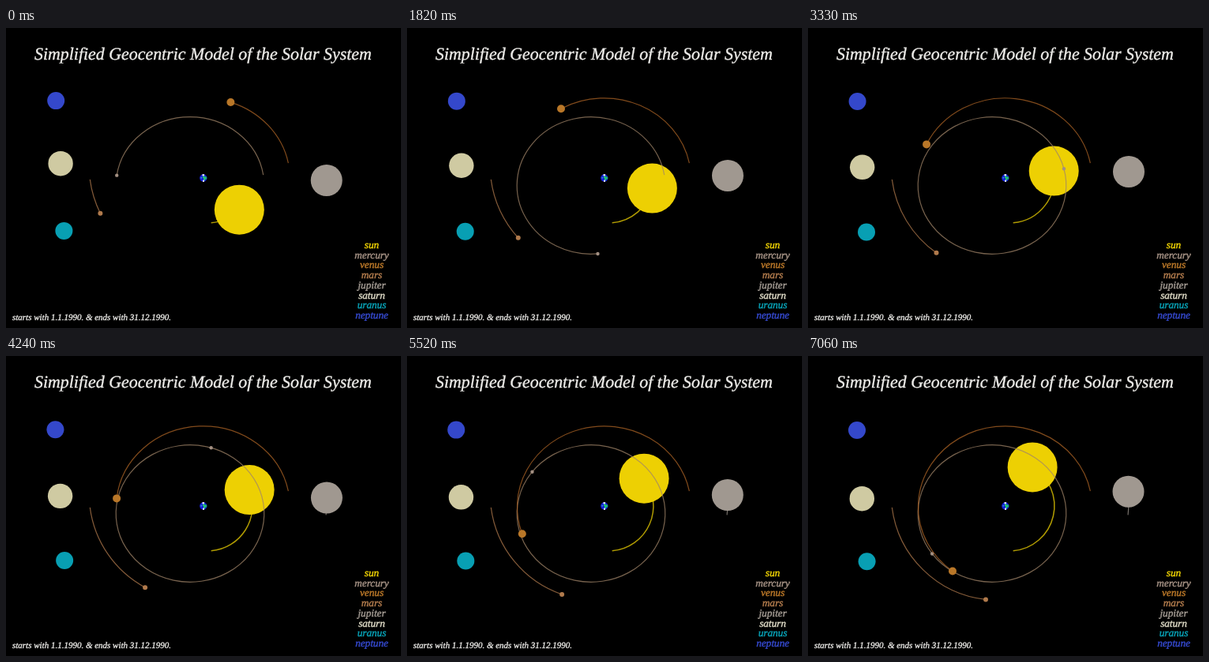
Animation of 500 by 380 pixels, one loop 7.09 s. Source, as an HTML page:

```html
<!DOCTYPE html>
<html lang="en">
<head>
<meta charset="utf-8">
<title>Simplified Geocentric Model of the Solar System</title>
<style>
  html, body { margin: 0; width: 100%; height: 100%; overflow: hidden; background: #000; }
  svg { display: block; width: 500px; height: 380px; }
  text { font-family: "Liberation Serif", "Times New Roman", serif; font-style: italic; fill: #ecebe8; text-rendering: geometricPrecision; }
  .title { font-size: 21.9px; stroke: #ecebe8; stroke-width: .4px; }
  .note { font-size: 11px; stroke: #ecebe8; stroke-width: .35px; }
  .legend text { font-size: 13.2px; text-anchor: middle; stroke-width: .45px; }
</style>
</head>
<body>
<svg viewBox="0 0 500 380">
  <rect width="500" height="380"/>
  <g id="earth">
    <circle cx="249.8" cy="190" r="4.7" fill="#1420d8"/>
    <path d="M249 187.5h2.5v1h2.5v3h-2v1.5h-2v-3h-1z" fill="#20c070"/>
    <path d="M248.5 185.3h2.5v2h-2.5zM249 192.8h2v2h-2z" fill="#fff"/>
    <path d="M246.5 189h1.5v1.5h-1.5z" fill="#38a8c8"/>
  </g>
  <g id="sky"></g>
  <text class="title" x="36" y="40">Simplified Geocentric Model of the Solar System</text>
  <text class="note" x="8" y="370">starts with 1.1.1990. &amp; ends with 31.12.1990.</text>
  <g class="legend" id="legend"></g>
</svg>
<script>
const LOOP = 7090, FPS = 33;
const KNOTS = [0, 23, 60, 110, 140, 182, 233];
const DRIFT = [0, .106, .283, .51, .626, .79, 1];

// orbit: [cx, cy, rx, ry]; angles in degrees, counter-clockwise, from the right
const bodies = [
  { name: "sun", color: "#edd003", r: 31.5, orbit: [254.8, 189.9, 57.1, 57.1], from: -85.1,
    angles: [-44.8, -33.4, -13.3, 8.9, 20.9, 37.5, 59.1], width: 1.5, alpha: .75 },
  { name: "mercury", color: "#a39083", trailColor: "#a08468", r: 2.2, orbit: [233, 199.5, 93.8, 86.8], from: 8.8,
    angles: [171.5, 209, 275.2, 374.2, 433.5, 502.6, 576], width: 1.2, alpha: .75 },
  { name: "venus", color: "#b97728", trailColor: "#b96c28", r: 5, orbit: [249.5, 191.1, 110, 102.3], from: 11.3,
    angles: [71.5, 89.1, 119.7, 154.7, 174, 199.5, 232.8], width: 1.2, alpha: .7 },
  { name: "mars", color: "#b07a4c", r: 3, orbit: [240, 174.5, 134.8, 134.8], from: 187.4,
    angles: [206.5, 212.2, 222.6, 234.9, 241.7, 251, 263.6], width: 1.2, alpha: .75 },
  { name: "jupiter", color: "#a09890", r: 20, orbit: [250, 184, 156, 156], from: -6.4,
    angles: [-3.31, -2.46, -1.1, .73, 1.62, 2.94, 4.52], width: 1.2, alpha: .75 },
  { name: "saturn", color: "#cfcaa2", label: "#dcd8c4", r: 15.7, line: [69.1, 171.7, 68.3, 180.7] },
  { name: "uranus", color: "#089fb3", r: 11, line: [73.4, 256.9, 74.6, 260.2] },
  { name: "neptune", color: "#3448cb", r: 11, line: [63.2, 92.1, 62, 94] }
];

function make(tag, attrs, parent) {
  const el = document.createElementNS("http://www.w3.org/2000/svg", tag);
  for (const key in attrs) el.setAttribute(key, attrs[key]);
  return parent.appendChild(el);
}

// cubic Hermite curve through the knots
function curve(values, x) {
  const last = KNOTS.length - 1;
  const slope = i => {
    const a = Math.max(i - 1, 0), b = Math.min(i + 1, last);
    return (values[b] - values[a]) / (KNOTS[b] - KNOTS[a]);
  };
  let i = 0;
  while (i < last - 1 && x >= KNOTS[i + 1]) i++;
  const h = KNOTS[i + 1] - KNOTS[i], u = (x - KNOTS[i]) / h, v = 1 - u;
  return v * v * (1 + 2 * u) * values[i] + u * v * v * h * slope(i)
       + u * u * (3 - 2 * u) * values[i + 1] - u * u * v * h * slope(i + 1);
}

function onOrbit([cx, cy, rx, ry], deg) {
  const a = deg * Math.PI / 180;
  return [cx + rx * Math.cos(a), cy - ry * Math.sin(a)];
}

function trailPath(orbit, from, to) {
  const end = Math.min(to, from + 360);
  const arc = deg => `A${orbit[2]} ${orbit[3]} 0 0 0 ${onOrbit(orbit, deg)}`;
  return `M${onOrbit(orbit, from)}${arc((from + end) / 2)}${arc(end)}`;
}

const sky = document.getElementById("sky");
const legend = document.getElementById("legend");

bodies.forEach((b, i) => {
  if (b.orbit) {
    b.trail = make("path", {
      fill: "none", stroke: b.trailColor || b.color, "stroke-width": b.width, opacity: b.alpha
    }, sky);
  }
  b.disc = make("circle", { r: b.r, fill: b.color }, sky);
  const ink = b.label || b.color;
  make("text", { x: 463, y: 279 + i * 12.7, style: `fill:${ink};stroke:${ink}` }, legend).textContent = b.name;
});

function draw(step) {
  const drift = curve(DRIFT, step);
  for (const b of bodies) {
    let x, y;
    if (b.orbit) {
      const angle = curve(b.angles, step);
      [x, y] = onOrbit(b.orbit, angle);
      b.trail.setAttribute("d", trailPath(b.orbit, b.from, angle));
    } else {
      const [x0, y0, x1, y1] = b.line;
      x = x0 + (x1 - x0) * drift;
      y = y0 + (y1 - y0) * drift;
    }
    b.disc.setAttribute("cx", x);
    b.disc.setAttribute("cy", y);
  }
}

const start = performance.now();
function tick() {
  const t = (performance.now() - start) % LOOP;
  draw(Math.min(233, Math.floor((t + 5) * FPS / 1000)));
  requestAnimationFrame(tick);
}
tick();
</script>
</body>
</html>
```
